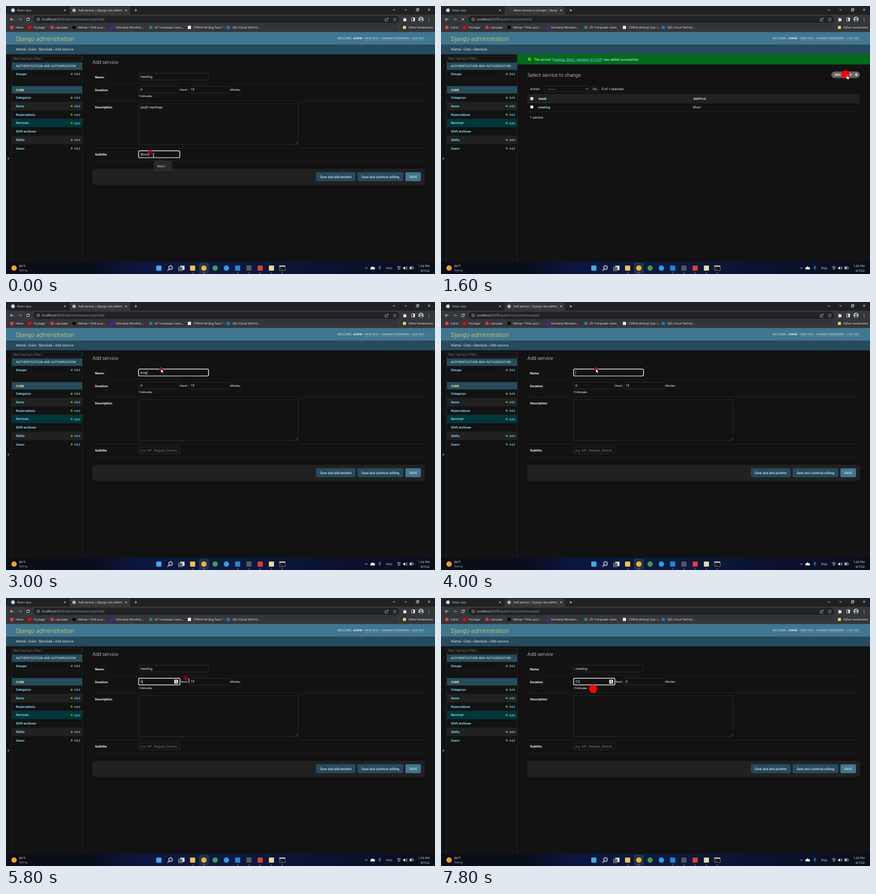
An HTML page that plays this animation: 800 px wide and 500 px high, repeating every 8000 ms.

```html
<!DOCTYPE html>
<html lang="en">
<head>
<meta charset="utf-8">
<title>Admin session</title>
<style>
  html, body { margin: 0; width: 100%; height: 100%; overflow: hidden; background: #121212; }
  svg { display: block; width: 100vw; height: 100vh; }
  text { font-family: Roboto, sans-serif; text-rendering: geometricPrecision; white-space: pre; }
  .ui { font-family: "Open Sans", sans-serif; }
  .b { font-weight: 700; }
  .light { font-weight: 300; }
</style>
</head>
<body>
<svg viewBox="0 0 800 500">
  <defs>
    <linearGradient id="bar">
      <stop offset="0" stop-color="#0b0e15"/><stop offset=".2" stop-color="#0a0d1c"/>
      <stop offset=".3" stop-color="#0b1540"/><stop offset=".5" stop-color="#0d1a40"/>
      <stop offset=".75" stop-color="#0a1230"/><stop offset="1" stop-color="#0a0e1b"/>
    </linearGradient>
    <clipPath id="tabClip"><rect x="130" y="0" width="86.5" height="16"/></clipPath>
    <clipPath id="hintClip"><rect x="248" y="270" width="73.5" height="13"/></clipPath>
  </defs>
  <g id="backdrop"></g>
  <g id="live"></g>
</svg>
<script>
const LOOP = 8000, STEP = 200;
const TEAL = '#264b5d', BLUE = '#417690', LINK = '#81d4fa', PANEL = '#212121', EDGE = '#353535', INK = '#eee';

// Drawing helpers; each returns SVG markup
const rect = (x, y, w, h, fill, more = '') =>
  `<rect x="${x}" y="${y}" width="${w}" height="${h}" fill="${fill}" ${more}/>`;
const dot = (x, y, r, fill, more = '') => `<circle cx="${x}" cy="${y}" r="${r}" fill="${fill}" ${more}/>`;
const square = (x, y, size, fill) => rect(x - size / 2, y - size / 2, size, size, fill, 'rx="1"');
const shape = (d, fill, more = '') => `<path d="${d}" fill="${fill}" ${more}/>`;
const line = (d, color = INK, width = .8) => shape(d, 'none', `stroke="${color}" stroke-width="${width}"`);
const text = (x, y, str, size = 6.15, fill = INK, more = '') =>
  `<text x="${x}" y="${y}" font-size="${size}" fill="${fill}" ${more}>${str}</text>`;
const ui = (x, y, str, size = 5.6, fill = '#e8eaed', more = '') => text(x, y, str, size, fill, `class="ui" ${more}`);
const bold = (x, y, str, size = 6.1, fill = INK) => text(x, y, str, size, fill, 'class="b"');
const plus = (x, y, r, color, width) => line(`M${x - r} ${y}h${2 * r}M${x} ${y - r}v${2 * r}`, color, width);
const cross = (x, y, r, color = INK) =>
  line(`M${x - r} ${y - r}l${2 * r} ${2 * r}m0 ${-2 * r}l${-2 * r} ${2 * r}`, color);

const pen = document.createElement('canvas').getContext('2d');
pen.font = '100px Roboto, sans-serif';
const widthOf = (str, size) => pen.measureText(str).width * size / 100;

function browser() {
  const bookmarks = [
    [11, 18, 'Inbox', '#ea4335'], [44, 52, 'Footage', '#f00'], [86, 92, 'calculate', '#dc3048'],
    [127, 134, 'Velmar • Find your...', '#08090b'], [197.5, 205, 'Scholarly Wordsto...', '#5a12b5'],
    [270, 277, '29 "computer scien...', '#247a87'], [342, 350, 'TORVA Writing Task 1...', '#f4f4f4'],
    [414.5, 422, 'QEL Cloud Technic...', '#1976d2']
  ];
  return rect(0, 0, 800, 17, '#202124') + rect(0, 16, 800, 33, '#35363a') +
    shape('M116 16q3 0 3-3V4q0-3 3-3h106q3 0 3 3v9q0 3 3 3z', '#35363a') +
    dot(13, 8, 3.4, '#bcd9e6') + ui(21, 10.2, 'React App', 5.5, '#d0d2d6') +
    cross(110, 8, 1.6) + cross(224, 8, 1.6) + plus(242, 8, 2.4, INK, .8) +
    line('M721 6l2.3 2.3 2.3-2.3M743 7h4.5M765 6h3.6v3.6h-3.6zM766.3 6V4.7h3.6v3.6h-1.2') + cross(789, 7, 2) +
    line('M14 25H8m2.6-2.8L7.8 25l2.8 2.8', INK, .9) + line('M23 25h6m-2.6-2.8L29.2 25l-2.8 2.8', '#8b8d91', .9) +
    rect(51, 18.5, 682, 13, '#202124', 'rx="6.5"') +
    dot(60, 25, 2.7, 'none', 'stroke="#bdc1c6" stroke-width=".7"') + line('M60 24.3v2.2M60 22.9v.7', '#bdc1c6', .7) +
    line('M709 24h-2v4h5v-2M709 26q0-3 4-3m-1.6-1.6L713.2 23l-1.8 1.7', '#c4c7cb', .7) +
    line('M725 21.8l1 2.1 2.3.3-1.7 1.6.4 2.3-2-1.1-2 1.1.4-2.3-1.7-1.6 2.3-.3z', '#c4c7cb', .6) +
    shape('M741 23h1.5a1.2 1.2 0 0 1 2.2 0h1.6v1.6a1.2 1.2 0 0 1 0 2.2v1.7H741z', INK) +
    line('M756.5 22h5.5v6h-5.5z', INK, .8) + rect(759.5, 22, 2.8, 6, INK) +
    dot(774, 25, 4.9, '#a9bccb') + dot(774, 23.6, 1.7, '#33404d') + shape('M770.5 28.3q3.5-4.5 7 0-3.5 2.6-7 0', '#33404d') +
    [22.7, 25, 27.3].map(y => dot(789, y, .6, INK)).join('') +
    bookmarks.map(([ix, tx, label, color]) => square(ix, 40, 6, color) + ui(tx, 42.1, label)).join('') +
    line('M734 36v8', '#5f6368', .6) + square(743, 40, 5.6, '#f5d37a') + ui(750.5, 42.1, 'Other bookmarks');
}

function sidebar() {
  const links = ['Categorys', 'Items', 'Reservations', 'Services', 'Shift archives', 'Shifts', 'Users'];
  const add = y => plus(122.5, y, 2.2, '#70bf2b', 1.2) + text(127, y + 2.2, 'Add', 6.15, LINK);
  const rows = links.map((name, i) => {
    const y = 171.2 + i * 15.72;
    const fill = name === 'Services' ? '#00363a' : i % 2 ? PANEL : '#121212';
    return rect(11, y - 7.8, 131, 15.7, fill) + line(`M11 ${y + 7.8}h131`, '#272727', .5) +
      bold(18.5, y + 2.1, name, 6.1, LINK) + (name === 'Shift archives' ? '' : add(y));
  }).join('');
  return line('M10.5 90v387M142.3 90v387', '#2b2b2b', .7) + text(2.3, 286.6, '«', 9.4, LINK) +
    rect(11, 93.3, 130.7, 9.7, '#151515', 'stroke="#353535" stroke-width=".6"') +
    text(13.5, 100.2, 'Starting'.slice(0, 5) + ' typing to filter...', 6.1, '#777') +
    rect(11, 105.3, 131, 14, TEAL) + text(18.5, 114.4, 'AUTHENTICATION AND AUTHORIZATION', 6.08) +
    bold(18.5, 129.2, 'Groups', 6.1, LINK) + add(127) + line('M11 135h131', '#272727', .5) +
    rect(11, 149.3, 131, 14.2, TEAL) + bold(18.5, 158.6, 'CORE', 6, '#f5e6a3') + rows;
}

function siteHeader() {
  const nav = (x, str, more = '') => text(x, 62.4, str, 5.1, '#e4eef2', `letter-spacing=".23" ${more}`);
  return rect(0, 48.5, 800, 24, BLUE) + rect(0, 72.3, 800, 17.9, TEAL) +
    text(18.7, 64.6, 'Django administration', 11.2, '#f5dd5d', 'class="light"') +
    nav(618, 'WELCOME,') + nav(647.5, 'ADMIN', 'class="b"') + nav(664.5, '.') + nav(668.5, 'VIEW SITE') +
    nav(695.5, '/') + nav(700, 'CHANGE PASSWORD') + nav(754, '/') + nav(758, 'LOG OUT') +
    line('M668.5 64h26M700 64h53M758 64h22.5', '#9db9c5', .4);
}

function taskbar() {
  const icon = {
    square: (x, c) => square(x, 489, 9.5, c),
    circle: (x, c) => dot(x, 489, 5, c)
  };
  const apps = [
    [285, 'square', '#35b3ee'], [348, 'square', '#f6c545'], [369, 'circle', '#e5b92f'], [390, 'circle', '#3f9a55'],
    [411, 'circle', '#2ba3de'], [432, 'square', '#2389d3'], [453, 'square', '#565b60'], [474, 'square', '#e23b34'],
    [495, 'square', '#e6dfa4']
  ];
  const running = [348, 369, 432, 453, 474, 495, 515];
  return rect(0, 477, 800, 23, 'url(#bar)') + rect(360, 479, 18, 20, '#25324e', 'rx="2"') +
    dot(15, 489, 5, '#f5a122') + ui(24.5, 487.2, '84°F', 5.7) + ui(24.5, 495, 'Sunny', 5.6, '#aeb3bb') +
    dot(307, 488, 3.6, '#26314b', 'stroke="#eee" stroke-width="1.1"') + line('M304.3 490.8l-3 3', INK, 1.3) +
    rect(325, 484.5, 8, 8, '#d8dadd') + rect(321.5, 487, 7.5, 7, '#555a62', 'stroke="#ccc" stroke-width=".4"') +
    apps.map(([x, kind, color]) => icon[kind](x, color)).join('') +
    rect(510, 484.5, 10.5, 9, '#08090a', 'stroke="#ccc" stroke-width=".6"') + rect(510, 484.5, 10.5, 2, '#ddd') +
    line('M512 488.5l1.5 1.2-1.5 1.2m2.5.3h2', INK, .6) +
    running.map(x => rect(x - 1.5, 497.4, 3, 1, x === 369 ? '#60b9ef' : '#8a919c', 'rx=".5"')).join('') +
    line('M669.5 490.3l2.5-2.5 2.5 2.5', INK, .8) +
    shape('M680.5 491.5a2 2 0 0 1 .4-3.8 2.6 2.6 0 0 1 4.7-.3 2.1 2.1 0 0 1 1 4.1z', INK) +
    rect(695.7, 484.7, 2.6, 5, '#2f7fd6', 'rx="1.3"') + line('M694.3 488q0 3 2.7 3t2.7-3M697 491v2', '#2f7fd6', .7) +
    ui(709, 491, 'ENG', 5.5) +
    line('M729 487.5q3.7-3.3 7.4 0M730.3 489.2q2.4-2 4.8 0', INK, .9) + dot(732.7, 491, 1.1, INK) +
    shape('M740.5 487.8h1.5l2.2-2v6.4l-2.2-2h-1.5z', INK) + line('M745.5 487q1.3 2 0 4M747 485.8q2.2 3.2 0 6.4', INK, .6) +
    rect(752.5, 486.3, 6.5, 4.6, 'none', 'rx="1" stroke="#eee" stroke-width=".7"') + rect(753.5, 487.2, 3, 2.8, INK) +
    rect(759.4, 487.7, .9, 1.8, INK) + ui(790, 496, '9/7/22', 5.6, INK, 'text-anchor="end"');
}

function field(x, y, w, h, value, { focus, caret = focus, number, selected } = {}) {
  const end = x + 3.3 + widthOf(value, 6.2);
  const spin = x + w - 10.5;
  return rect(x, y, w, h, '#121212', `rx="2" stroke="${focus ? '#fff' : EDGE}" stroke-width="${focus ? 1.2 : .7}"`) +
    (selected ? rect(x + 3, y + 2.5, end - x - 3, 8, '#3367d1') : '') +
    text(x + 3.3, y + 8.6, value, 6.2) +
    (caret ? line(`M${end + .5} ${y + 3}v7.5`, '#fff', .6) : '') +
    (focus && number ? rect(spin, y + 3, 7, 7.2, '#f2f2f2', 'rx=".6"') +
      shape(`M${spin + 1.7} ${y + 5.8}l1.8-1.8 1.8 1.8zm0 1.6l1.8 1.8 1.8-1.8z`, '#333') : '');
}

function popup(x, y, w, h, items, opacity = 1) {
  return `<g opacity="${opacity}">` + rect(x, y, w, h, '#292a2d', 'rx="1"') +
    shape(`M${x + 6.5} ${y}l3.7-3.2 3.7 3.2z`, '#292a2d') +
    items.map((s, i) => ui(x + 5.8, y + 12.6 + i * 17, s, 6)).join('') + '</g>';
}

const button = (x, w, label, fill) => rect(x, 310.2, w, 16.6, fill, 'rx="2"') +
  text(x + w / 2, 320.7, label, 6.2, '#fff', 'text-anchor="middle"');

function formPage(s) {
  const note = (x, y, str) => text(x, y, str, 5.2, '#ddd', 'stroke="#ddd" stroke-width=".08"');
  const label = (y, str) => bold(166, y, str);
  return text(161.3, 108.4, 'Add service', 9.4, INK, 'class="light"') +
    line('M161 144.3h620M161 176.7h620M161 265.2h620M161 289.5h620', '#272727', .7) +
    label(134.8, 'Name:') + label(159, 'Duration:') + label(191.2, 'Description:') + label(279.4, 'Subtitle:') +
    field(247.3, 125.2, 130.3, 12.8, s.name, { focus: s.focus === 'name' }) +
    field(247.3, 149.6, 77, 12.6, s.hours, { focus: s.focus === 'hours', number: true }) + note(324.3, 157.8, 'Hours') +
    field(341, 149.6, 77, 12.6, s.minutes, { focus: s.focus === 'minutes', number: true, selected: s.selected }) +
    note(418.2, 157.8, 'Minutes') + note(247, 169.9, '15 Minutes') +
    field(247.3, 182, 297, 77, s.filled ? 'shoft meetings' : '') +
    (s.filled ? line('M250.5 192' + 'q.8-1.4 1.6 0t1.6 0'.repeat(4) + 'q.8-1.4 1.6 0', '#e33', .6) : '') +
    line('M540 258l3.5-3.5M542 258l1.5-1.5', '#888', .5) +
    field(247.3, 270.2, 76.8, 12.8, s.filled ? 'Short' : '', { focus: s.focus === 'subtitle' }) +
    (s.filled ? '' : text(250.6, 278.8, 'e.g. VIP , Regular, Dentist, ...', 6.2, '#777', 'clip-path="url(#hintClip)"')) +
    rect(161.3, 304.2, 619.5, 28.4, PANEL, 'rx="2" stroke="#272727" stroke-width=".6"') +
    button(578, 73.8, 'Save and add another', TEAL) + button(655.7, 85.2, 'Save and continue editing', TEAL) +
    button(744.8, 29, 'SAVE', BLUE) +
    (s.shortHint ? popup(276, 288.4, 33.5, 19.5, ['short'], s.shortHint) : '') +
    (s.nameHint ? popup(294.2, 142.3, 39.8, 55, ['meeting', 'meeing', 'meeting']) : '');
}

function listPage() {
  const box = y => rect(166.6, y, 5.4, 5.4, '#fff', 'rx=".8" stroke="#777" stroke-width=".5"');
  return rect(142.5, 90.2, 657.5, 18.8, '#006b1b') +
    dot(165, 99.6, 3, '#70bf2b') + line('M163.5 99.5l1.2 1.3 2-2.4', '#06511a', .8) +
    text(173.3, 101.8, `The service “<tspan fill="${LINK}" text-decoration="underline">meeting- Short - duration: 0:15:00</tspan>” was added successfully.`, 6.15) +
    text(161.3, 132.2, 'Select service to change', 9.4, INK, 'class="light"') +
    rect(728, 122.2, 53, 12, '#666', 'rx="6"') + bold(733.8, 130, 'ADD SERVICE', 5.2, '#fff') + plus(774.4, 128.2, 2.5, '#fff', 1.2) +
    text(166, 156.8, 'Action:') + rect(192.3, 149.4, 84.5, 10.8, '#121212', 'rx="2" stroke="#353535" stroke-width=".7"') +
    text(199, 156.6, '---------', 6.15) + line('M270.6 153.8l1.8 1.8 1.8-1.8', INK, .9) +
    rect(279.8, 149.4, 14.2, 10.8, '#121212', 'rx="2" stroke="#353535" stroke-width=".7"') + text(283, 156.8, 'Go') +
    text(300, 156.8, '0 of 1 selected') +
    rect(161.3, 165, 619.5, 16.2, PANEL) + line('M161 165h620M161 181.2h620M161 197.3h620', '#2c2c2c', .7) +
    box(170) + bold(182, 175.2, 'NAME', 5.2) + bold(470.8, 175.2, 'SUBTITLE', 5.2) +
    box(185.7) + bold(181, 191, 'meeting', 6.1, LINK) + text(469.6, 191, 'Short') + text(166, 210.2, '1 service');
}

// Value of the latest key at or before t
const hold = (t, keys) => keys.filter(k => k[0] <= t).pop()[1];

const path = [
  [0, 269, 273], [200, 300, 276], [600, 715, 314], [800, 754.5, 317.5], [1000, 754.5, 317.5], [1400, 754, 127.5],
  [1800, 754, 127.5], [2400, 289, 125], [5000, 289, 125], [5400, 288, 151], [5800, 335, 149], [6000, 345, 151],
  [6600, 345, 151], [7200, 279, 152], [7400, 279, 154], [7800, 283.5, 169.5], [8000, 283.5, 169.5]
];
function pointerAt(t) {
  const i = path.findIndex(k => k[0] > t);
  const [t0, x0, y0] = path[i - 1], [t1, x1, y1] = path[i];
  const k = (t - t0) / (t1 - t0), ease = k * k * (3 - 2 * k);
  return [x0 + (x1 - x0) * ease, y0 + (y1 - y0) * ease];
}

const clicks = [800, 1600, 2400, 5400, 6000, 7200, 7800];
const pointers = {
  arrow: shape('M0 0v7.2l1.7-1.5 1.2 2.6 1.1-.5-1.1-2.5h2.3z', '#fff', 'stroke="#111" stroke-width=".5"'),
  hand: shape('M2.2 1.2q.8-.8 1.5 0v3l2.9.7q.9.3.7 1.3l-.6 2.9H3.5L1.3 6q.1-.9.9-.5z', '#fff', 'stroke="#111" stroke-width=".5"'),
  beam: line('M4.5 1.7q1.5 0 1.5 1v5q0 1-1.5 1M7.5 1.7q-1.5 0-1.5 1v5q0 1 1.5 1', '#ddd', .7)
};
function pointer(t) {
  const [x, y] = pointerAt(t);
  const kind = hold(t, [[0, 'beam'], [200, 'arrow'], [600, 'hand'], [1200, 'arrow'], [1400, 'hand'], [1800, 'arrow'],
    [5400, 'beam'], [7600, 'arrow']]);
  const mark = clicks.includes(t) ? dot(0, 0, 7.6, '#f00') : dot(0, 0, 4.2, '#b00010', 'opacity=".7"');
  const glyph = pointers[kind];
  return `<g transform="translate(${x} ${y})">` + (kind === 'arrow' && clicks.includes(t) ? glyph + mark : mark + glyph) + '</g>';
}

function chromeState(list, loading) {
  const title = list ? 'Select service to change | Django site admin' : 'Add service | Django site admin';
  return ui(135, 10.2, title, 5.5, '#e8eaed', 'clip-path="url(#tabClip)"') +
    (loading ? cross(41, 25, 2.2) :
      dot(127, 8, 3.1, '#c8cacd') + line('M124.2 8h5.6M127 5v6', '#6c7075', .5) +
      line('M43.2 23.6a2.7 2.7 0 1 0 .4 2', INK, .9) + shape('M44 21.8v2.6h-2.6z', INK)) +
    ui(67, 27.2, `localhost<tspan fill="#9aa0a6">:8000/admin/core/service/${list ? '' : 'add/'}</tspan>`, 6.3) +
    text(18.8, 83.2, `Home › Core › Services${list ? '' : '<tspan fill="#cfe3ec"> › Add service</tspan>'}`, 6.65);
}

function scene(t) {
  const list = t >= 1200 && t < 2000;
  const loading = hold(t, [[0, 0], [800, 1], [1200, 0], [1600, 1], [2000, 0]]);
  const form = {
    filled: t < 1200,
    name: hold(t, [[0, 'meeting'], [1200, ''], [2600, 'l'], [2800, 'lon'], [3000, 'long'], [3400, 'lon'], [3600, 'lo'],
      [3800, 'l'], [4000, ''], [4400, 'm'], [4600, 'me'], [4800, 'meet'], [5000, 'meeting']]),
    hours: hold(t, [[0, '0'], [7400, '01']]),
    minutes: hold(t, [[0, '15'], [6400, ''], [6600, '0']]),
    selected: t === 6200,
    focus: hold(t, [[0, 'subtitle'], [800, ''], [2400, 'name'], [5400, 'hours'], [6000, 'minutes'], [7200, 'hours']]),
    shortHint: hold(t, [[0, 1], [800, .35], [1000, 0]]),
    nameHint: t >= 4400 && t < 5200
  };
  return chromeState(list, loading) + (list ? listPage() : formPage(form)) +
    ui(790, 487.2, t < 4000 ? '1:02 PM' : '1:03 PM', 5.6, INK, 'text-anchor="end"') + pointer(t);
}

document.getElementById('backdrop').innerHTML =
  rect(0, 0, 800, 500, '#121212') + browser() + siteHeader() + sidebar() + taskbar();

const live = document.getElementById('live');
let shown = -1;
function tick() {
  const t = Math.floor(performance.now() % LOOP / STEP) * STEP;
  if (t !== shown) live.innerHTML = scene(shown = t);
  requestAnimationFrame(tick);
}
tick();
</script>
</body>
</html>
```
